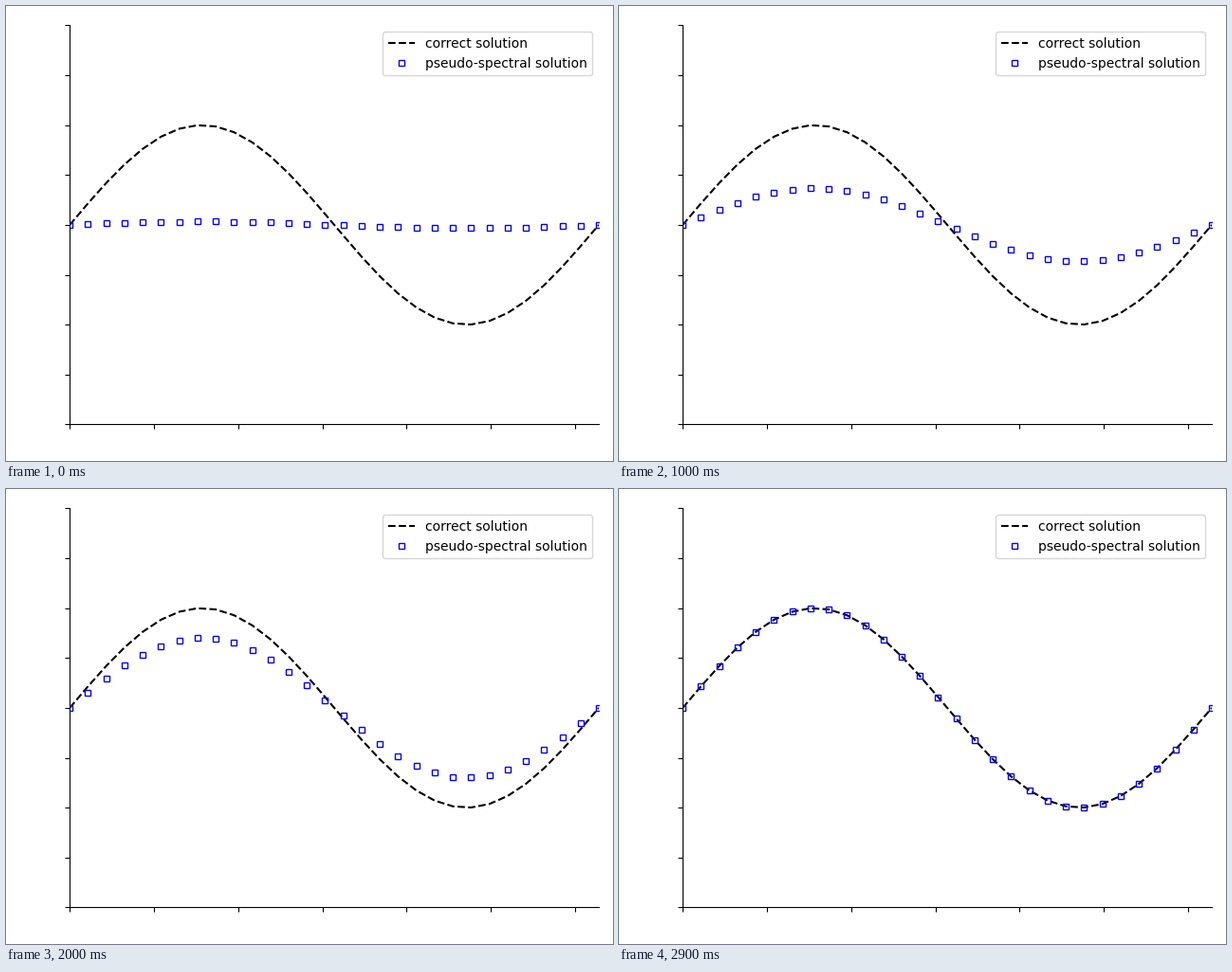
A matplotlib script for the animation above (4 s loop, 640 by 480 pixels).

```python
import numpy as np
import matplotlib.pyplot as plt
from matplotlib.animation import FuncAnimation

W, H, DPI = 640, 480, 100
LEFT, RIGHT, BOTTOM, TOP = 67.2, 625, 38.6, 459.6
FRAMES, INTERVAL, STEPS = 40, 100, 30

plt.rcParams["font.family"] = "DejaVu Sans"
fig = plt.figure(figsize=(W / DPI, H / DPI), dpi=DPI, facecolor="white")
ax = fig.add_axes([LEFT / W, BOTTOM / H, (RIGHT - LEFT) / W, (TOP - BOTTOM) / H])
ax.set(xlim=(0, 2 * np.pi), ylim=(-2, 2),
       xticks=range(7), yticks=np.linspace(-2, 2, 9))
ax.tick_params(labelbottom=False, labelleft=False)
ax.spines[["top", "right"]].set_visible(False)

x = np.linspace(0, 2 * np.pi, 30)
wave = np.sin(x)
ax.plot(x, wave, "k--", label="correct solution")
points, = ax.plot(x, wave / STEPS, "bs", ms=4, mfc="none",
                  label="pseudo-spectral solution")
ax.legend(loc="upper right")


def update(frame):
    # The amplitude grows linearly, then holds at the exact solution.
    points.set_ydata(wave * min(frame + 1, STEPS) / STEPS)
    return points,


anim = FuncAnimation(fig, update, frames=FRAMES, interval=INTERVAL,
                     repeat=True, repeat_delay=0)
plt.show()
```
